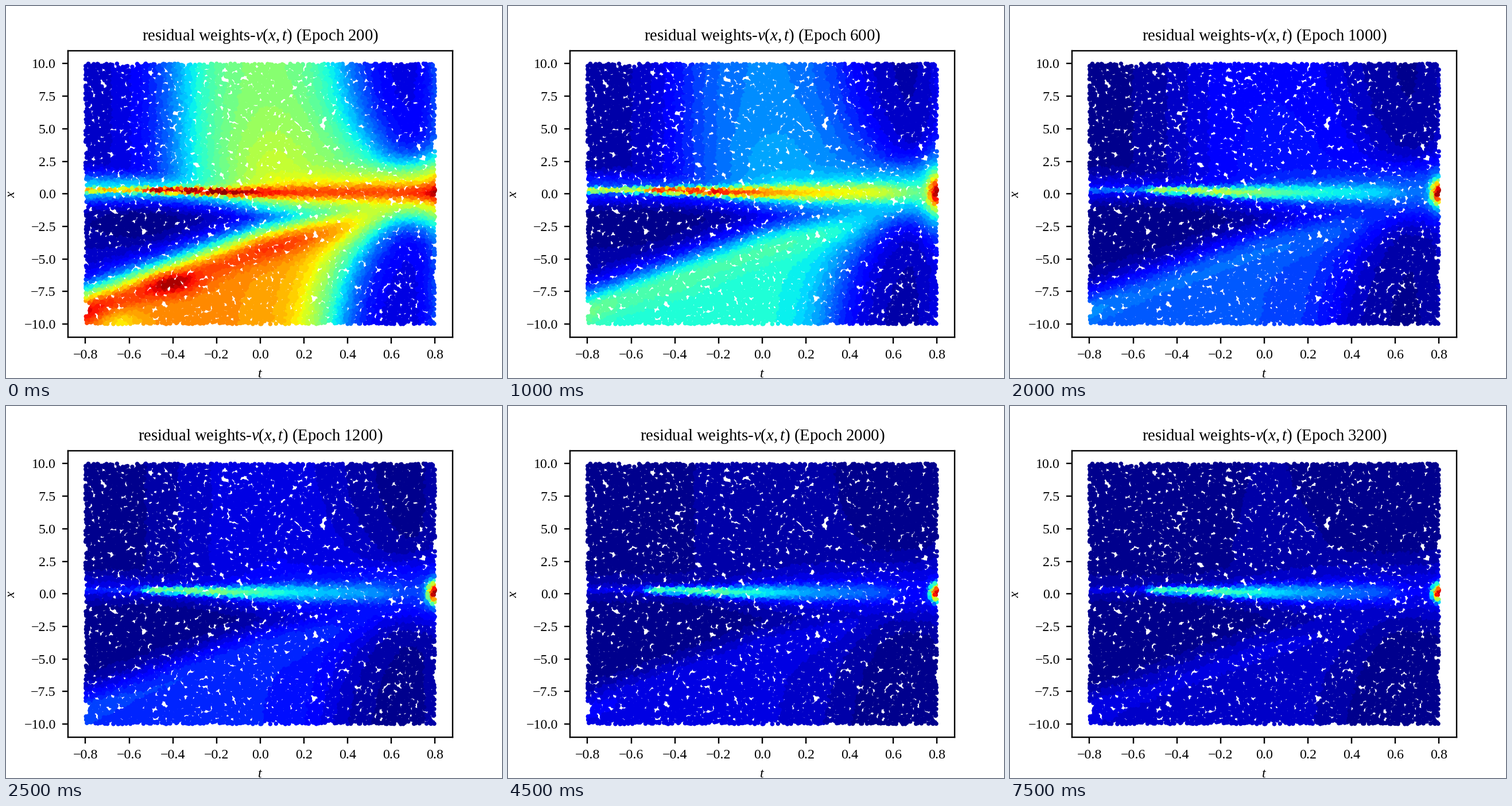
Write a matplotlib script that moves like this. It is 864 px wide and 648 px high and loops after 8000 ms.

```python
import numpy as np
import matplotlib.pyplot as plt
from matplotlib.animation import FuncAnimation
from matplotlib.colors import ListedColormap

FRAMES, STEP_MS, EPOCH_STEP = 16, 500, 200
W, H, DPI = 864, 648, 216
N, LEVELS = 20000, 40

plt.rcParams.update({
    "font.family": "Liberation Serif",
    "font.size": 8,
    "mathtext.fontset": "custom",
    "mathtext.rm": "Liberation Serif",
    "mathtext.it": "Liberation Serif:italic",
})


def sig(z):
    return 1 / (1 + np.exp(-np.clip(z, -40, 40)))


def bump(a, b=0.0):
    return np.exp(-a ** 2 - b ** 2)


def mix(end, start, k):
    return end + (start - end) * k


# Latin hypercube sample of the (t, x) domain
rng = np.random.default_rng(7)
t, x = ((rng.permutation(N) + rng.random(N)) / N for _ in range(2))
t, x = 1.6 * t - 0.8, 20 * x - 10

# Upper plume
right = 0.35 + 0.5 * np.exp(-np.abs(x) / 3.5)
plume = (sig((t + 0.37) / 0.1) * sig((right - t) / 0.09) * sig(x / 0.5)
         * (1 + 0.2 * bump((t - 0.05) / 0.2, x / 5)))

# Lower lobe with a bright ridge along its upper side
ridge_x = -4 + np.where(t < 0, 6.0, 4.0) * t
lobe = sig((ridge_x + 1.3 - x) / 0.6) * sig((right - 0.06 - t) / 0.085)
ridge = bump((x - ridge_x) / 1.3) * (1 + 0.8 * bump((t + 0.8) / 0.15))
spots = (0.15 * bump((t + 0.42) / 0.14, (x + 6.8) / 1.0)
         + 0.05 * bump((t - 0.08) / 0.16, (x - ridge_x) / 0.9)
         - 0.10 * bump((t + 0.65) / 0.1, (x + 9.9) / 1.2))

# Central streak: it starts abruptly and widens to the right
start = sig((t + 0.54) / 0.01)
streak = bump((x - 0.3 + 0.2 * sig((t + 0.25) / 0.12))
              / (0.28 + 0.75 * sig(t / 0.17)))
early_peak = 0.68 + 0.3 * start * bump((t + 0.3) / 0.35)
late_peak = 0.09 + start * (0.12 + 0.24 * bump((t + 0.3) / 0.45))
tail_off = sig((t - 0.65) / 0.06)

halo = ((0.5 + 0.5 * sig((t + 0.1) / 0.12))
        * bump((x - 0.4 + 0.2 * sig(t / 0.12)) / (1.1 + 1.3 * sig(t / 0.12))))
floor = 1 - bump((t + 0.55) / 0.3, (x + 2) / 2)
edge = np.exp((t - 0.8) / 0.06)


def field(i):
    """Weights at step i: broad parts decay, a hot spot grows at t = 0.8."""
    k = np.exp(-(i / 2.6) ** 1.1)
    k_streak = 1 / (1 + (i / 3) ** 4)
    grow = 1 - k ** 3
    dt = (0.795 - t) / mix(0.03, 0.08, k)
    dx = (x - 0.1) / mix(0.7, 2.7, k)
    parts = [
        mix(0.0205, 0.47, k) * plume,
        lobe * (mix(0.06, 0.70, k) + mix(0.02, 0.13, k) * ridge
                + k ** 3 * spots),
        mix(0.09, 0.62, k) * halo,
        mix(late_peak, early_peak, k_streak) * streak * (1 - (1 - k) * tail_off),
        0.95 * grow * bump(dt, dx),
        mix(0.2, 0.7, k) * grow * bump(dt / 2, dx / 1.7),
    ]
    union = sum(p ** 4 for p in parts) ** 0.25
    rest = mix(0.005, 0.055, k) * floor + mix(0.01, 0.14, k) * edge
    return np.clip(union + rest, 0, 1)


fig, ax = plt.subplots(figsize=(W / DPI, H / DPI), dpi=DPI)
ax.set_xlim(-0.88, 0.88)
ax.set_ylim(-11, 11)
ax.set_xticks(np.linspace(-0.8, 0.8, 9))
ax.set_yticks(np.linspace(-10, 10, 9))
ax.set_xlabel("$t$")
ax.set_ylabel("$x$")

bands = ListedColormap(plt.get_cmap("jet")((np.arange(LEVELS) + 0.5) / LEVELS))
dots = ax.scatter(t, x, c=field(0), s=6.25, linewidths=0,
                  cmap=bands, vmin=0, vmax=1)
title = ax.set_title("")


def update(i):
    dots.set_array(field(i))
    title.set_text(f"residual weights-$v(x,t)$ (Epoch {EPOCH_STEP * (i + 1)})")
    return dots, title


anim = FuncAnimation(fig, update, frames=FRAMES, interval=STEP_MS, repeat=True)
plt.show()
```
